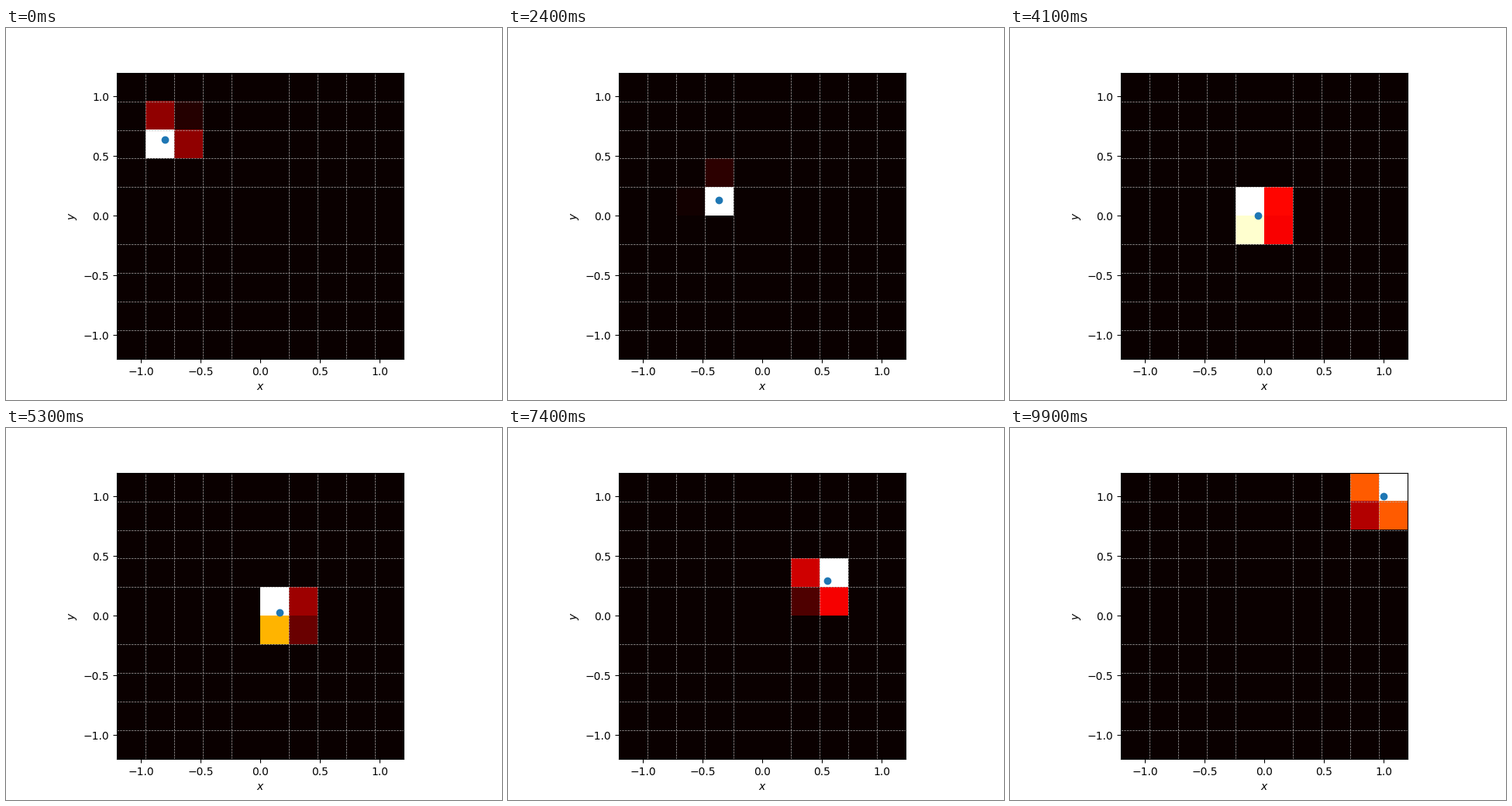
A matplotlib script for the animation above (10000 ms loop, 640 by 480 pixels).

```python
import numpy as np
import matplotlib.pyplot as plt
from matplotlib.animation import FuncAnimation

FRAMES = 100
CELLS = 10
LIMIT = 1.2

edges = np.linspace(-LIMIT, LIMIT, CELLS + 1)
centers = (edges[:-1] + edges[1:]) / 2
step = edges[1] - edges[0]
path_x = np.linspace(-0.8, 1.0, FRAMES)


def hat(p):
    """Linear weight of a coordinate on each cell center."""
    return np.clip(1 - np.abs(centers - p) / step, 0, None)


def deposit(x, y):
    """Share a point among its four nearest cells."""
    return np.outer(hat(y), hat(x))


fig, ax = plt.subplots(figsize=(6.4, 4.8), dpi=100)
image = ax.imshow(np.zeros((CELLS, CELLS)), cmap="hot", origin="lower",
                  extent=(-LIMIT, LIMIT, -LIMIT, LIMIT))
dot, = ax.plot([], [], "o", color="C0")

ticks = np.arange(-1, 1.1, 0.5)
ax.set_xticks(ticks)
ax.set_yticks(ticks)
ax.set_xticks(edges[1:-1], minor=True)
ax.set_yticks(edges[1:-1], minor=True)
ax.tick_params(which="minor", length=0)
ax.grid(which="minor", linestyle="--", linewidth=0.5)
ax.set_xlim(-LIMIT, LIMIT)
ax.set_ylim(-LIMIT, LIMIT)
ax.set_xlabel("$x$")
ax.set_ylabel("$y$")


def update(i):
    x = path_x[i]
    y = x**2
    weights = deposit(x, y)
    image.set_data(weights)
    image.set_clim(0, weights.max())
    dot.set_data([x], [y])
    return image, dot


anim = FuncAnimation(fig, update, frames=FRAMES, interval=100,
                     repeat=True, repeat_delay=0)
plt.show()
```
